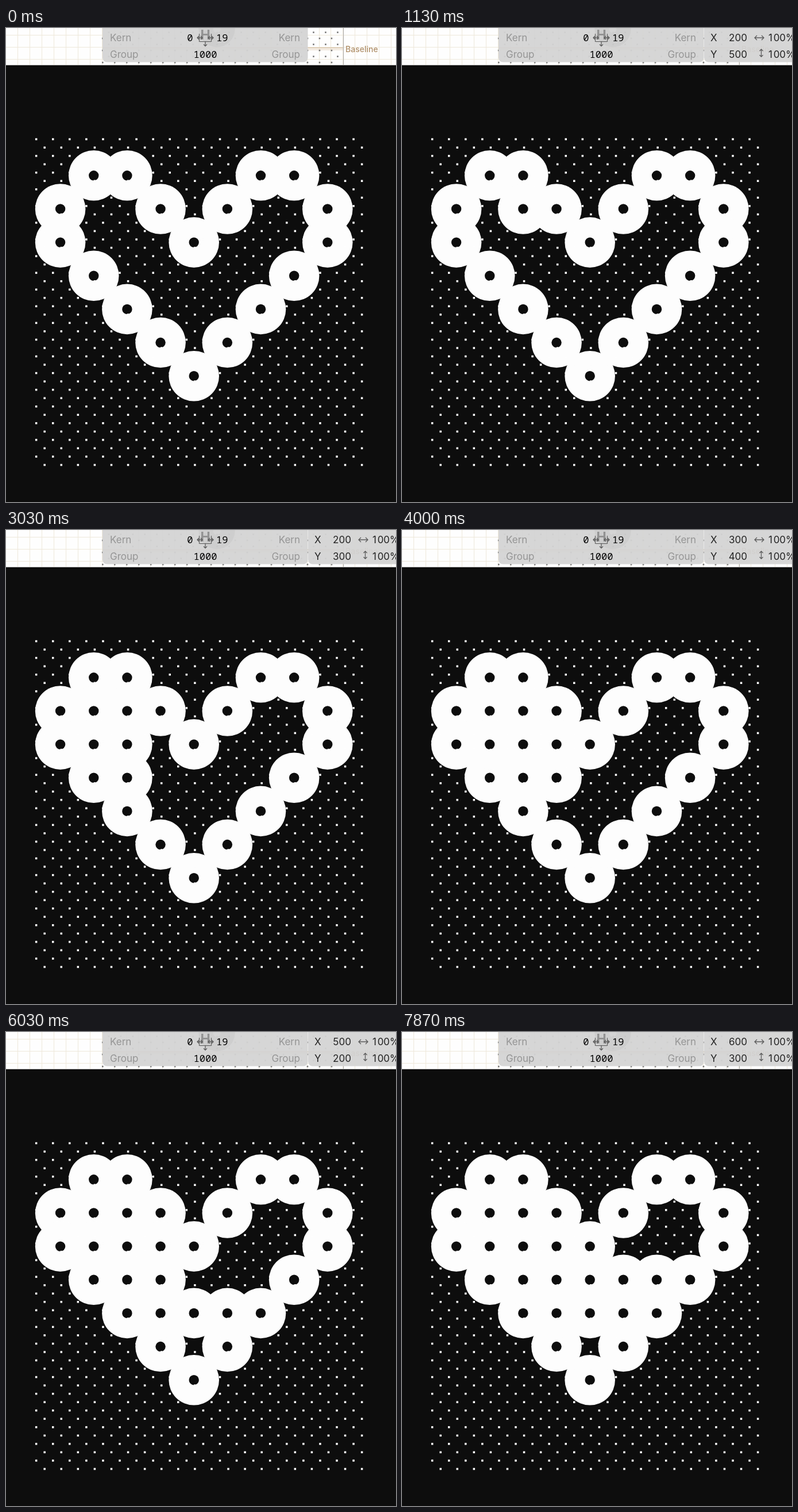
Recreate the animation shown at these times as an HTML page with a canvas. Size 679 by 825 pixels, loop 8000 ms.

```html
<!DOCTYPE html>
<html lang="en">
<head>
<meta charset="utf-8">
<title>Glyph component editor</title>
<style>
html, body { margin: 0; width: 100%; height: 100%; overflow: hidden; background: #0d0d0d; }
canvas { display: block; width: 679px; height: 825px; }
</style>
</head>
<body>
<canvas id="stage" width="679" height="825"></canvas>
<script>
const ctx = document.getElementById('stage').getContext('2d');
const LOOP = 8000;
const SANS = '17px Inter, "Open Sans", sans-serif';
const MONO = '500 17px "Noto Sans Mono", "DejaVu Sans Mono", monospace';
const BLACK = '#0d0d0d', WHITE = '#fdfdfd';

// Preview scale: one step is 100 font units
const STEP = 58.15, LEFT = 94.6, BASE = 605.7, RADIUS = 43.8, HOLE = 8.7;

const MOVES = { L: [-1, 0], R: [1, 0], U: [0, 1], D: [0, -1] };

// Runs of cursor moves: start, time per move, directions.
// A small letter takes back the last circle.
const runs = [
  [1130, 485, 'LLDR'], [3030, 485, 'DRUD'], [4700, 500, 'DRD'],
  [5930, 100, 'uR'], [6770, 400, 'UL'], [7670, 200, 'RR']
];

const key = (x, y) => x + ',' + y;

// Walks the corners of the left half and mirrors each point
function heart() {
  const corners = [[4, 4], [2, 6], [1, 6], [0, 5], [0, 4], [4, 0]];
  const points = new Map();
  let [x, y] = corners[0];
  for (const [cx, cy] of corners) {
    while (x !== cx || y !== cy) {
      x += Math.sign(cx - x);
      y += Math.sign(cy - y);
      for (const px of [x, 8 - x]) points.set(key(px, y), [px, y]);
    }
  }
  return points.set(key(4, 4), [4, 4]);
}

function stateAt(t) {
  const circles = heart();
  let [x, y] = [3, 5];
  for (const [start, gap, moves] of runs) {
    [...moves].forEach((move, i) => {
      if (t < start + i * gap) return;
      const [dx, dy] = MOVES[move.toUpperCase()];
      if (move === move.toLowerCase()) circles.delete(key(x, y));
      x += dx;
      y += dy;
      circles.set(key(x, y), [x, y]);
    });
  }
  return { circles: [...circles.values()], pos: [x, y] };
}

function rect(x, y, w, h, color) {
  ctx.fillStyle = color;
  ctx.fillRect(x, y, w, h);
}

function disc(x, y, r, color) {
  ctx.fillStyle = color;
  ctx.beginPath();
  ctx.arc(x, y, r, 0, Math.PI * 2);
  ctx.fill();
}

function label(text, x, y, color, align = 'left', font = SANS) {
  ctx.font = font;
  ctx.fillStyle = color;
  ctx.textAlign = align;
  ctx.fillText(text, x, y);
}

// Evenly spaced figures
function figures(text, x, y, color) {
  [...text].forEach((c, i) => label(c, x + 5 + i * 10.6, y, color, 'center'));
}

// Arrow centred on x, y; heads lists the ends that get a tip
function arrow(x, y, half, tip, angle = 0, heads = [-1, 1]) {
  ctx.save();
  ctx.translate(x, y);
  ctx.rotate(angle);
  ctx.strokeStyle = '#5c5c5c';
  ctx.lineWidth = 1.3;
  ctx.beginPath();
  ctx.moveTo(-half, 0);
  ctx.lineTo(half, 0);
  for (const s of heads) {
    ctx.moveTo(s * (half - tip), -tip);
    ctx.lineTo(s * half, 0);
    ctx.lineTo(s * (half - tip), tip);
  }
  ctx.stroke();
  ctx.restore();
}

function panel(x, w) {
  ctx.fillStyle = 'rgba(212,212,212,0.94)';
  ctx.beginPath();
  ctx.roundRect(x, -20, w, 79.5, 8);
  ctx.fill();
}

// Checkerboard of square dots
function dots(x, y, cols, rows, gap, size, color) {
  for (let j = 0; j < rows; j++) {
    for (let i = j % 2; i < cols; i += 2) rect(x + i * gap, y + j * gap, size, size, color);
  }
}

function drawEditView() {
  const cell = 20.98, line = '#eee8da';
  rect(0, 0, 679, 65, '#fefefe');
  for (let x = 20; x < 679; x += cell) rect(Math.round(x), 0, 1, 64, line);
  for (let y = 12; y < 64; y += 21) rect(0, y, 679, 1, line);
  rect(168, 33, 420, 6, 'rgba(226,205,180,0.4)');
  rect(168, 34, 420, 1, '#d8c4ac');
  dots(167, -4.2, 40, 7, cell / 2, 2.6, '#777');
  rect(587, 0, 1, 64, '#aaa');
  label('Baseline', 591, 42, '#b0906a', 'left', '500 14px Inter, sans-serif');
  rect(0, 64, 679, 1, '#b4b4b4');
}

function drawKernIcon(x) {
  label('H', x, 20, '#929292', 'center', '700 23px Inter, sans-serif');
  for (const side of [-1, 1]) {
    rect(x + side * 10.5 - 0.6, 10, 1.2, 14, '#666');
    arrow(x + side * 9.5, 17, 4.5, 3);
  }
  rect(x - 10, 23, 20, 1.2, '#666');
  arrow(x, 27.5, 4, 3, Math.PI / 2, [1]);
}

function drawKernPanel() {
  const gray = '#959595';
  panel(168, 357.5);
  disc(367, 2, 31.5, 'rgba(0,0,0,0.035)');
  disc(367, 2, 6.5, 'rgba(255,255,255,0.12)');
  ['Kern', 'Group'].forEach((text, i) => {
    const y = 23 + i * 28.7;
    label(text, 181, y, gray);
    label(text, 512, y, gray, 'right');
  });
  label('0', 325.5, 23, '#000', 'right', MONO);
  label('19', 366, 23, '#000', 'left', MONO);
  label('1000', 347, 51.7, '#000', 'center', MONO);
  drawKernIcon(347);
}

function drawPosPanel(pos, alpha) {
  const ink = '#222';
  ctx.globalAlpha = alpha;
  panel(526, 180);
  ['X', 'Y'].forEach((name, i) => {
    const y = 23.2 + i * 28.5;
    label(name, 537, y, ink);
    figures(pos[i] + '00', 569.3, y, ink);
    figures('100', 636.5, y, ink);
    label('%', 668, y, ink);
  });
  arrow(622, 17, 8, 4);
  arrow(625.5, 43.5, 6.5, 3, Math.PI / 2);
  ctx.globalAlpha = 1;
}

function drawPreview(circles) {
  rect(0, 65, 679, 760, BLACK);
  const spots = circles.map(([x, y]) => [LEFT + x * STEP, BASE - y * STEP]);
  for (const [x, y] of spots) disc(x, y, RADIUS, WHITE);
  for (const [x, y] of spots) disc(x, y, HOLE, BLACK);
  dots(50.9, 191.8, 40, 40, STEP / 4, 3.5, WHITE);
}

function draw(t) {
  const { circles, pos } = stateAt(t);
  drawEditView();
  drawKernPanel();
  if (t >= 30) drawPosPanel(pos, Math.min(1, Math.floor((t - 30) / 67.5 + 1) / 5));
  drawPreview(circles);
}

function tick() {
  draw(performance.now() % LOOP);
  requestAnimationFrame(tick);
}
tick();
</script>
</body>
</html>
```
